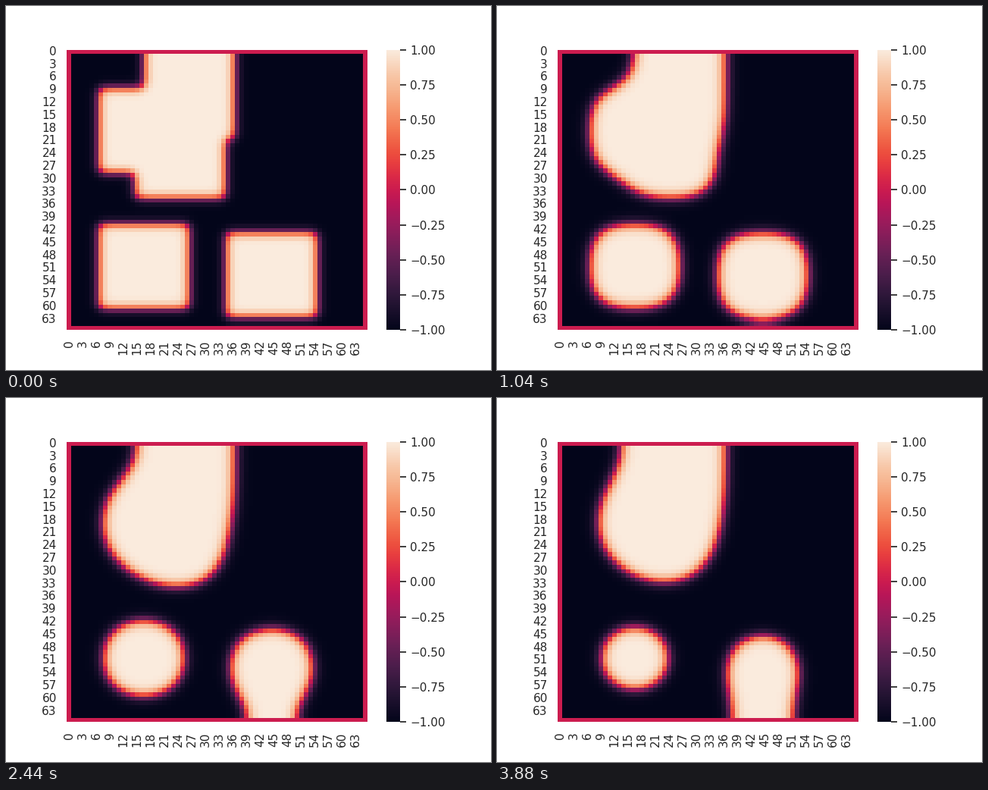
Animation, 640 px wide and 480 px high, one loop 4 s. Source, as a matplotlib script:

```python
import numpy as np
import matplotlib.pyplot as plt
from matplotlib.animation import FuncAnimation
from matplotlib.colors import LinearSegmentedColormap

FRAMES, INTERVAL = 100, 40
N = 64                      # interior cells per side
STEPS, DT = 4, 0.1          # solver steps per frame, step size in cell units
EPS2 = (4 / (2 * np.sqrt(2) * np.arctanh(0.9))) ** 2

INK = "0.15"
plt.rcParams.update({
    "font.family": "DejaVu Sans",
    "text.color": INK,
    "xtick.color": INK, "ytick.color": INK,
    "xtick.labelsize": 11, "ytick.labelsize": 11,
    "xtick.major.size": 6, "ytick.major.size": 6,
    "xtick.major.width": 1.25, "ytick.major.width": 1.25,
    "xtick.bottom": False, "ytick.left": False,
})


def heat_colors():
    """Dark navy through crimson to cream."""
    ramps = {
        11: "03051a 221331 451c47 691f55 921c5b b91657 d92847 ed503e "
            "f47d57 f6a47c f7c6a6 faebdd",
        7: "03051a 35193e 701f57 ad1759 e13342 f37651 f6b48f",
        5: "03051a 4c1d4b a11a5b e83f3f f69c73",
        2: "03051a cb1b4f",
    }
    stops = {k / n: "#" + c for n, row in ramps.items()
             for k, c in enumerate(row.split())}
    return LinearSegmentedColormap.from_list("heat", sorted(stops.items()), N=256)


def start_field():
    """Five overlapping 20 x 20 squares of +1 on a -1 ground."""
    u = -np.ones((N, N))
    for x, y in [(17, 1), (7, 9), (15, 15), (7, 41), (35, 43)]:
        u[y - 1:y + 19, x - 1:x + 19] = 1
    return u


def advance(u):
    """Allen-Cahn flow with zero-flux walls over one frame."""
    for _ in range(STEPS):
        p = np.pad(u, 1, mode="edge")
        lap = p[:-2, 1:-1] + p[2:, 1:-1] + p[1:-1, :-2] + p[1:-1, 2:] - 4 * u
        u = u + DT * (lap + (u - u ** 3) / EPS2)
    return u


def simulate():
    u = advance(start_field())
    fields = []
    for _ in range(FRAMES):
        u = advance(u)
        fields.append(np.pad(u, 1))     # rim of zeros
    return fields


fields = simulate()

fig, ax = plt.subplots(figsize=(6.4, 4.8), dpi=100)
mesh = ax.pcolormesh(fields[0], cmap=heat_colors(), vmin=-1, vmax=1)
ax.set(xlim=(0, N + 2), ylim=(N + 2, 0))
ax.spines[:].set_visible(False)

marks = np.arange(0, N + 2, 3)
ax.set_xticks(marks + 0.5, marks, rotation="vertical")
ax.set_yticks(marks + 0.5, marks, va="center")

bar = fig.colorbar(mesh, ax=ax, ticks=np.linspace(-1, 1, 9))
bar.outline.set_linewidth(0)


def update(i):
    mesh.set_array(fields[i])
    return [mesh]


anim = FuncAnimation(fig, update, frames=FRAMES, interval=INTERVAL,
                     repeat=True, repeat_delay=0, cache_frame_data=False)
plt.show()
```
